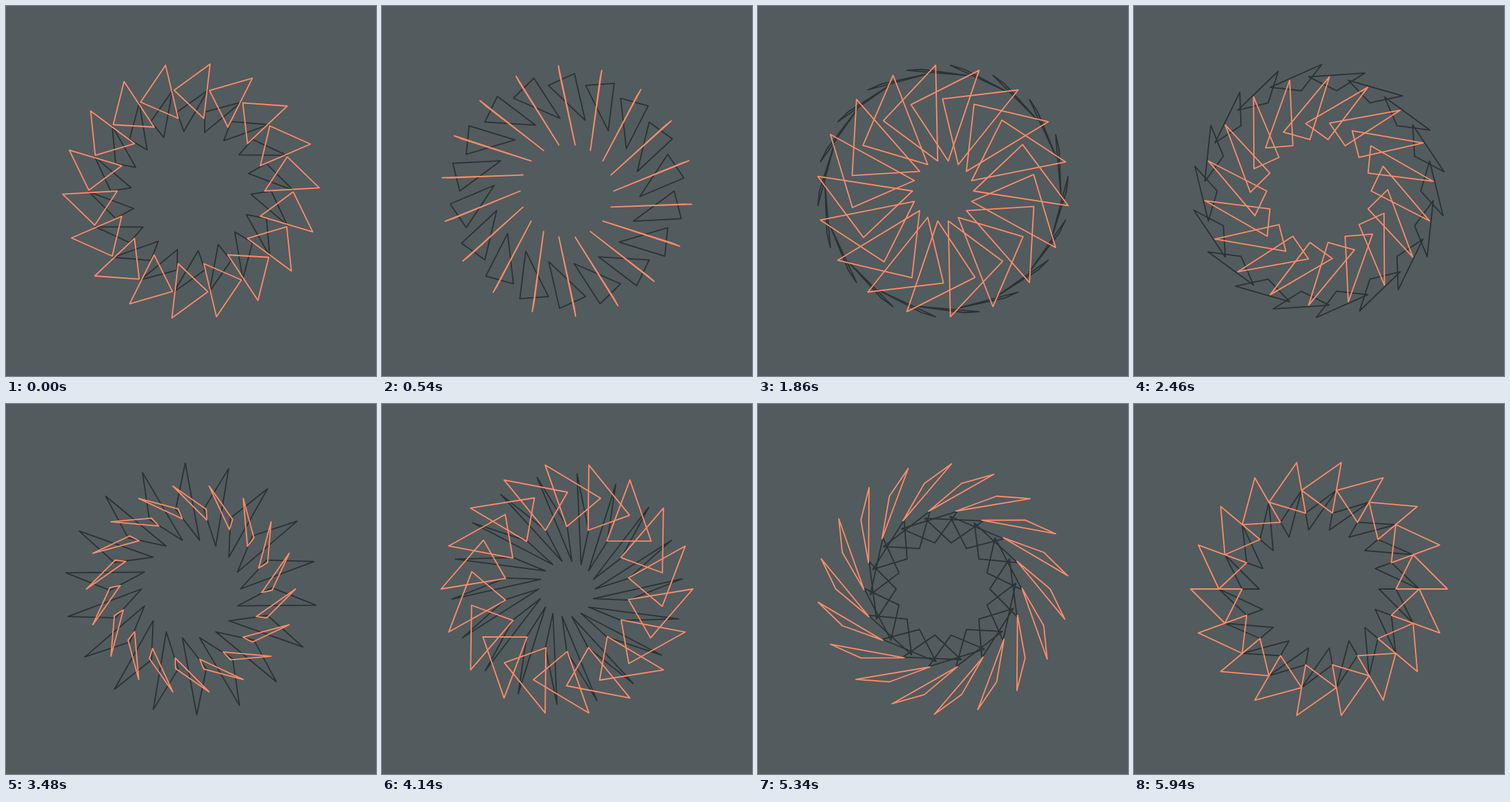
These frames come from a looping animation (540x540 px, 6000 ms). An HTML page with a canvas:

```html
<!DOCTYPE html>
<html lang="en">
<head>
<meta charset="utf-8">
<title>Triangle ring</title>
<style>
  html, body { margin: 0; height: 100%; overflow: hidden; background: #525b5e; }
  canvas { display: block; }
</style>
</head>
<body>
<canvas id="stage" width="540" height="540"></canvas>
<script>
const ctx = document.getElementById('stage').getContext('2d');
const STEP = 60, STEPS = 100, COUNT = 18;
const HALF = 50;
const RING = HALF / Math.tan(Math.PI / 9);

// dir = 1 or -1: the two rings run in opposite phase
function triangle(angle, dir) {
  const c = Math.cos(angle), s = Math.sin(angle);
  return [
    [RING + dir * HALF * c, -dir * 1.5 * HALF * s],
    [RING + HALF * s, -dir * HALF * c],
    [RING - HALF / 2 - dir * 1.5 * HALF * s, 0]
  ];
}

function drawRing(angle, dir, color) {
  const points = triangle(angle, dir);
  ctx.strokeStyle = color;
  for (let i = 0; i < COUNT; i++) {
    ctx.save();
    ctx.translate(270, 270);
    ctx.rotate(i * 2 * Math.PI / COUNT);
    ctx.beginPath();
    for (const [x, y] of points) ctx.lineTo(x, y);
    ctx.closePath();
    ctx.stroke();
    ctx.restore();
  }
}

function draw() {
  const step = Math.floor(performance.now() / STEP) % STEPS + 1;
  const angle = 2 * Math.PI * step / STEPS;
  ctx.fillStyle = '#525b5e';
  ctx.fillRect(0, 0, 540, 540);
  ctx.lineWidth = 1.8;
  ctx.lineJoin = 'round';
  drawRing(angle, -1, '#2b3233');
  drawRing(angle, 1, '#ff8c69');
  requestAnimationFrame(draw);
}
draw();
</script>
</body>
</html>
```
